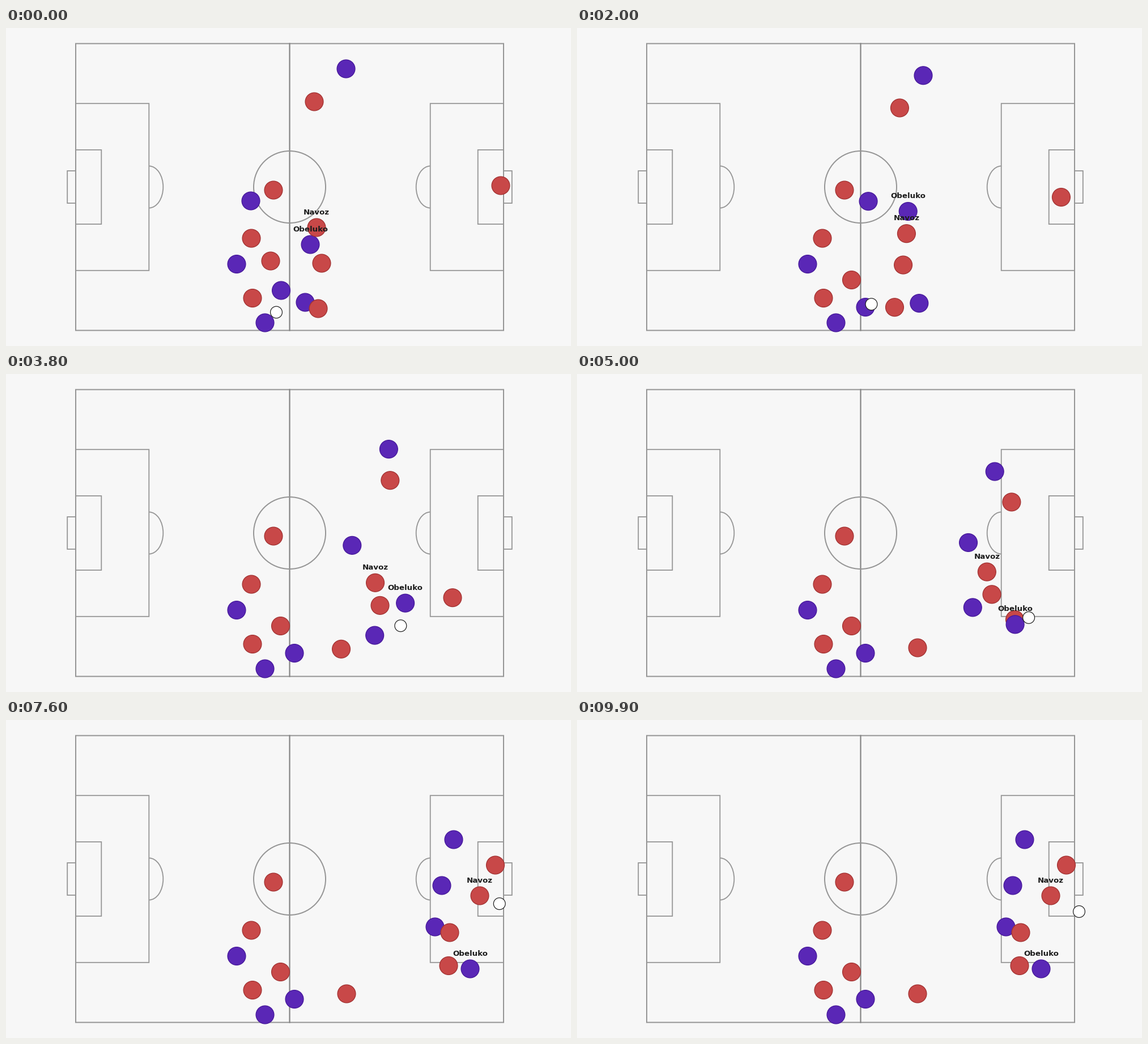
Recreate the animation shown at these times as a matplotlib script. Size 997x561 px, loop 10 s.

```python
import numpy as np
import matplotlib.pyplot as plt
from matplotlib.animation import FuncAnimation
from matplotlib.patches import Arc, Circle, Rectangle

W, H, DPI = 997, 561, 64
FRAMES, STEP = 100, 100
PT = 72 / DPI  # points per pixel

PAPER, LINE, INK = "#f7f7f7", "#959595", "#1c1c1c"
BLUE, BLUE_EDGE = "#5a27b6", "#46189a"
RED, RED_EDGE = "#c84848", "#a23232"

# Beats of the move, in seconds.
BEATS = dict(kick=1.45, settle=1.95, cross=2.9, catch=4.35, box=5.85, shot=7.35, end=9.8)
FEET = np.array([24, -12])  # ball relative to the player who carries it


def run(start, leave=BEATS["kick"], **stops):
    """Wait at start, then move at a steady pace from stop to stop."""
    times = [BEATS[beat] for beat in stops]
    points = [start, *stops.values()]
    if times and leave < times[0]:
        times.insert(0, leave)
    else:
        times.insert(0, 0)
    xs, ys = np.transpose(points)
    return lambda t: np.array([np.interp(t, times, xs), np.interp(t, times, ys)])


keeper = run((873, 278), cross=(824, 332), catch=(766, 433), box=(781, 433.5))
striker = run((537, 382), kick=(544, 314), cross=(650, 339), catch=(738, 444),
              box=(819, 439))
marker = run((548, 352), kick=(567, 357), cross=(605, 372), catch=(680, 366),
             box=(780, 327), shot=(836, 310))

blues = [
    run((600, 72), cross=(629, 103), box=(781, 200), shot=(790, 211)),
    run((432, 305), leave=0, cross=(551, 306), box=(747, 294), shot=(769, 292)),
    run((528, 484), kick=(597, 478), cross=(615, 498), box=(732, 377), shot=(757, 365)),
    run((485.5, 463), leave=0, settle=(509, 492.5)),
    run((407, 416.5)),
    run((457, 520)),
    striker,
]
reds = [
    run((544, 130), cross=(611, 159), box=(830, 253), shot=(863.5, 256)),
    run((557, 415), cross=(606, 423), box=(783, 375)),
    run((551, 495), catch=(601, 483)),
    run((467, 411), leave=0, settle=(484.5, 444.5)),
    run((472, 286)),
    run((433, 371)),
    run((435, 476.5)),
    marker,
]


def carried(beat):
    return striker(BEATS[beat]) + FEET


ball = run((477, 501.5), cross=(589, 464), catch=carried("catch"), box=carried("box"),
           shot=(869, 322.5), end=(886, 338))

fig = plt.figure(figsize=(W / DPI, H / DPI), dpi=DPI, facecolor=PAPER)
ax = fig.add_axes([0, 0, 1, 1])
ax.set_xlim(0, W)
ax.set_ylim(H, 0)
ax.axis("off")


def box(x0, y0, x1, y1, width=1.8):
    ax.add_patch(Rectangle((x0, y0), x1 - x0, y1 - y0, fill=False, ec=LINE, snap=False,
                           lw=width * PT, joinstyle="miter", zorder=1))


def draw_pitch():
    left, right, top, bottom = 123, 878, 27.5, 533.5
    mid, cy = (left + right) / 2, (top + bottom) / 2
    box(left, top, right, bottom, 2)
    ax.plot([mid, mid], [top, bottom], color="#858585", lw=2.2 * PT, snap=False, zorder=1)
    ax.add_patch(Circle((mid, cy), 63.5, fill=False, ec=LINE, lw=2 * PT, zorder=1))
    for goal, side in ((left, 1), (right, -1)):
        for depth, half in ((129.3, 147.3), (45.3, 65.5), (-14.8, 28.5)):
            edge = goal + side * depth
            box(goal, cy - half, edge, cy + half)
        start = -90 * side
        ax.add_patch(Arc((goal + side * 129.3, cy), 50, 74, theta1=start,
                         theta2=start + 180, ec=LINE, lw=1.8 * PT, zorder=1))


def disc(path, fill, edge, z, radius=15.9, width=1.3):
    patch = Circle(path(0), radius, fc=fill, ec=edge, lw=width * PT, zorder=z)
    ax.add_patch(patch)
    return patch, path


def label(name, path):
    text = ax.text(0, 0, name, family="DejaVu Sans", weight="bold", size=13.4 * PT,
                   color=INK, ha="center", va="baseline", zorder=6)
    return text, path


draw_pitch()
discs = [disc(keeper, RED, RED_EDGE, 2)]
discs += [disc(p, BLUE, BLUE_EDGE, 3) for p in blues]
discs += [disc(p, RED, RED_EDGE, 4) for p in reds]
discs.append(disc(ball, "white", INK, 5, 10.4, 1.2))
labels = [label("Navoz", marker), label("Obeluko", striker)]


def update(i):
    t = i * STEP / 1000
    for patch, path in discs:
        patch.center = path(t)
    for text, path in labels:
        x, y = path(t)
        text.set_position((x, y - 23.5))
    return [artist for artist, _ in discs + labels]


anim = FuncAnimation(fig, update, frames=FRAMES, interval=STEP, repeat=True,
                     repeat_delay=0, blit=False)
plt.show()
```
